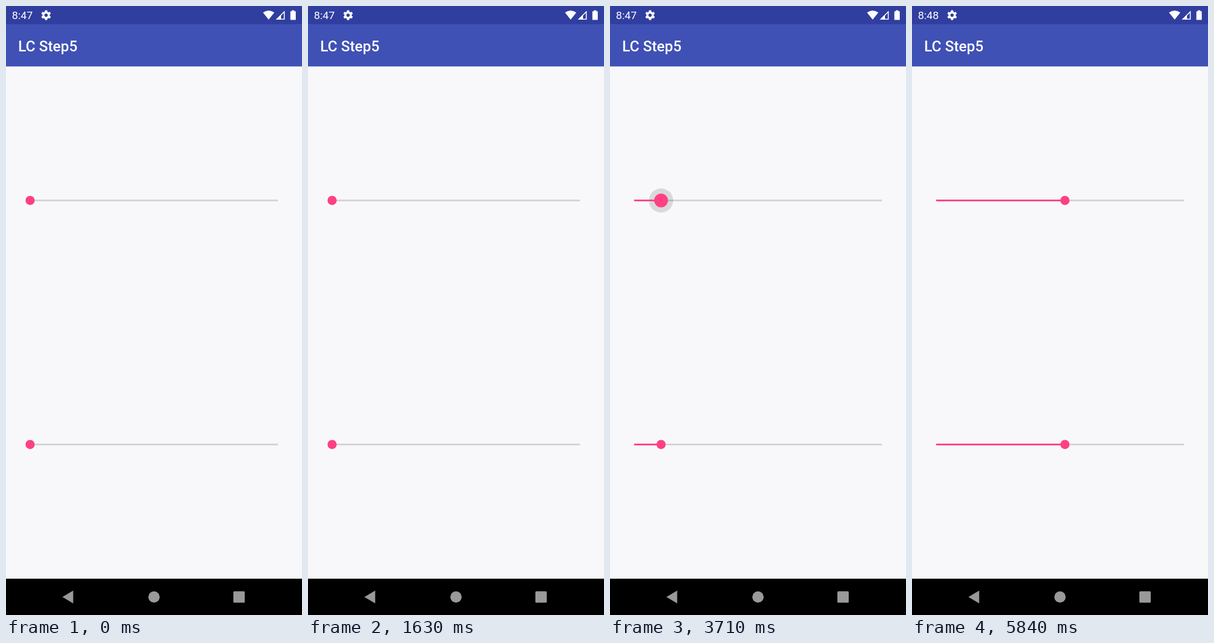
An HTML page with a canvas that plays this animation: 522x1073 px, repeating every 5.89 s.

```html
<!DOCTYPE html>
<html lang="en">
<head>
<meta charset="utf-8">
<title>Linked sliders</title>
<style>
  html, body { margin: 0; width: 100%; height: 100%; overflow: hidden; background: #f8f8fa; }
  canvas { display: block; width: 522px; height: 1073px; }
</style>
</head>
<body>
<canvas id="stage" width="522" height="1073"></canvas>
<script>
const ctx = document.getElementById('stage').getContext('2d');
const LOOP = 5890;
const PINK = '#ff4081';
const TRACK = { left: 42.5, right: 479.5, thickness: 3 };

// Drag of the thumb: [time in ms, x]
const drag = [
  [2880, 42.5], [3040, 156], [3300, 270], [3710, 90.3],
  [3780, 80], [4340, 340], [4430, 350], [4700, 269.7]
];

const clamp01 = v => Math.max(0, Math.min(1, v));
const progress = (t, from, to) => clamp01((t - from) / (to - from));
const easeOut = p => 1 - (1 - p) * (1 - p);

const slope = i => (drag[i + 1][1] - drag[i][1]) / (drag[i + 1][0] - drag[i][0]);

// Tangents that never overshoot: zero at turning points
function tangent(i) {
  if (i === 0) return slope(0);
  if (i === drag.length - 1) return 0;
  const a = slope(i - 1), b = slope(i);
  return a * b <= 0 ? 0 : 2 * a * b / (a + b);
}

function thumbX(t) {
  const last = drag.length - 1;
  if (t <= drag[0][0]) return drag[0][1];
  if (t >= drag[last][0]) return drag[last][1];
  const i = drag.findIndex((key, n) => t < drag[n + 1][0]);
  const [t0, x0] = drag[i], [t1, x1] = drag[i + 1];
  const span = t1 - t0, u = (t - t0) / span, v = 1 - u;
  return x0 * (1 + 2 * u) * v * v + tangent(i) * span * u * v * v
       + x1 * u * u * (3 - 2 * u) - tangent(i + 1) * span * u * u * v;
}

function rect(color, x, y, w, h) {
  ctx.fillStyle = color;
  ctx.fillRect(x, y, w, h);
}

function disc(color, x, y, r) {
  ctx.fillStyle = color;
  ctx.beginPath();
  ctx.arc(x, y, r, 0, 2 * Math.PI);
  ctx.fill();
}

function polygon(color, ...points) {
  ctx.fillStyle = color;
  ctx.beginPath();
  points.forEach(([x, y]) => ctx.lineTo(x, y));
  ctx.closePath();
  ctx.fill();
}

function label(text, font, x, y) {
  ctx.fillStyle = '#fff';
  ctx.font = font + ' Roboto, sans-serif';
  ctx.fillText(text, x, y);
}

function gear(x, y) {
  ctx.save();
  ctx.translate(x, y);
  for (let i = 0; i < 6; i++) {
    polygon('#fff', [-2.6, -5], [-1.8, -8.6], [1.8, -8.6], [2.6, -5]);
    ctx.rotate(Math.PI / 3);
  }
  ctx.strokeStyle = '#fff';
  ctx.lineWidth = 3.4;
  ctx.beginPath();
  ctx.arc(0, 0, 4.7, 0, 2 * Math.PI);
  ctx.stroke();
  ctx.restore();
}

function wifi() {
  ctx.fillStyle = '#fff';
  ctx.beginPath();
  ctx.moveTo(463.2, 24);
  ctx.lineTo(453.2, 11.4);
  ctx.quadraticCurveTo(463.2, 4.4, 473.2, 11.4);
  ctx.closePath();
  ctx.fill();
}

function signal() {
  polygon('#fff', [476, 24], [485, 15], [485, 24]);
  ctx.strokeStyle = '#fff';
  ctx.lineWidth = 1.6;
  ctx.beginPath();
  ctx.moveTo(477.8, 23.2);
  ctx.lineTo(490.7, 10.2);
  ctx.lineTo(490.7, 23.2);
  ctx.closePath();
  ctx.stroke();
}

function bars(t) {
  rect('#303f9f', 0, 0, 522, 32);
  rect('#3f51b5', 0, 32, 522, 74.5);
  label(t < 5250 ? '8:47' : '8:48', '19px', 10.5, 23);
  gear(70.7, 16.2);
  wifi();
  signal();
  rect('#fff', 501.5, 9.3, 9.5, 15.2);
  rect('#fff', 504, 7.6, 4.5, 2);
  label('LC Step5', '500 26px', 21.5, 80);

  rect('#000', 0, 1009, 522, 64);
  polygon('#999', [99.5, 1041.2], [118.5, 1030], [118.5, 1052.5]);
  disc('#999', 261, 1041.2, 10);
  ctx.fillStyle = '#999';
  ctx.beginPath();
  ctx.roundRect(401, 1031.2, 20, 20, 1.5);
  ctx.fill();
}

function slider(x, y, radius) {
  const { left, right, thickness } = TRACK;
  const top = y - thickness / 2;
  rect('rgba(0,0,0,0.15)', x, top, right - x, thickness);
  rect(PINK, left, top, x - left, thickness);
  disc(PINK, x, y, radius);
}

function draw(t) {
  rect('#f8f8fa', 0, 0, 522, 1073);
  bars(t);
  const x = thumbX(t);
  const release = progress(t, 5230, 5340);
  const ripple = progress(t, 2870, 3000);
  const press = progress(t, 2930, 3110) * (1 - release);
  if (ripple > 0 && release < 1) {
    disc(`rgba(0,0,0,${0.125 * ripple * (1 - release)})`, x, 342.6, 21.3 * easeOut(ripple));
  }
  slider(x, 342.6, 8.1 + 4 * press);
  slider(x, 772.6, 8.1);
}

function frame() {
  draw(performance.now() % LOOP);
  requestAnimationFrame(frame);
}
frame();
</script>
</body>
</html>
```
